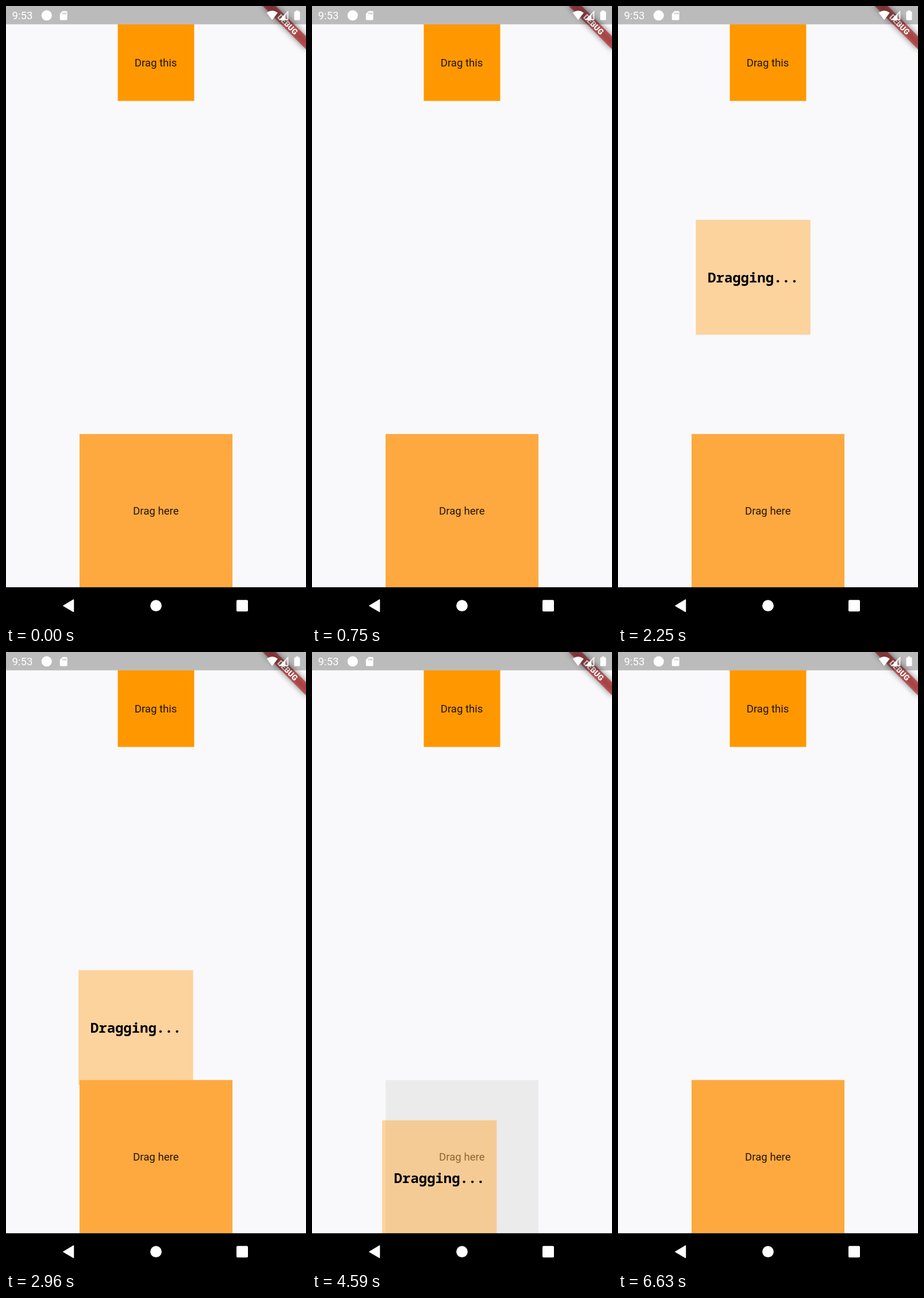
An HTML page for the animation above (6.85 s loop, 522 px wide and 1073 px high).

```html
<!DOCTYPE html>
<html lang="en">
<head>
<meta charset="utf-8">
<title>Drag and drop</title>
<style>
  html, body { margin: 0; width: 100%; height: 100%; overflow: hidden; background: #f9f9fb; }
  svg { display: block; width: 100%; height: 100%; }
  text { text-anchor: middle; }
  .label { font: 400 18.6px Roboto, sans-serif; fill: #000; fill-opacity: .87; }
  .mono { font: 700 23.93px "Noto Sans Mono", "DejaVu Sans Mono", monospace; fill: #000; }
  .clock { font: 400 18.6px Roboto, sans-serif; fill: #fff; text-anchor: start; }
  .debug { font: 900 13.56px Roboto, sans-serif; fill: #fff; }
</style>
</head>
<body>
<svg viewBox="0 0 522 1073">
  <defs>
    <filter id="blur" x="-30%" y="-200%" width="160%" height="500%">
      <feGaussianBlur stdDeviation="5.2"/>
    </filter>
  </defs>
  <rect width="522" height="1073" fill="#f9f9fb"/>

  <rect x="194.5" y="31.8" width="133" height="133" fill="#ff9800"/>
  <text class="label" x="260.6" y="104.8">Drag this</text>

  <rect id="target" x="128" y="743.2" width="266" height="266" fill="#fea940"/>
  <text class="label" x="260.8" y="882.8">Drag here</text>

  <g id="feedback" visibility="hidden">
    <rect width="199.4" height="199.4" fill="#ffab40" fill-opacity=".5"/>
    <text class="mono" x="99.7" y="108.6">Dragging...</text>
  </g>

  <!-- corner ribbon -->
  <g transform="translate(522 0) rotate(45)">
    <rect x="-53.2" y="37.2" width="106.4" height="16" fill="#000" fill-opacity=".5" filter="url(#blur)"/>
    <rect x="-53.2" y="37.2" width="106.4" height="16" fill="#b71c1c" fill-opacity=".63"/>
    <text class="debug" x="0" y="50">DEBUG</text>
  </g>

  <!-- status bar -->
  <rect width="522" height="31.8" fill="#000" fill-opacity=".25"/>
  <text class="clock" x="10.6" y="23.2">9:53</text>
  <g fill="#fff">
    <circle cx="70.8" cy="16.3" r="9"/>
    <path fill-rule="evenodd" d="M98.5 8.8H105Q106.6 8.8 106.6 10.4V22.8Q106.6 24.4 105 24.4H95.400Q93.800 24.4 93.800 22.8V13.500Z
      M98.300 11.500V14.500H99.800V11.500Z M100.900 11.500V14.500H102.400V11.500Z M103.500 11.500V14.500H105V11.500Z"/>
    <path d="M463.200 24.300L453.600 11.700Q463.200 4.300 472.800 11.700Z"/>
    <path d="M476.500 23.700L490.500 9.700V23.700Z" fill-opacity=".3" stroke="#fff" stroke-width="1.500"/>
    <path d="M476 24.200L486 14.200V24.200Z"/>
    <path d="M504.300 7.800H508.700V9.500H510.400Q511.500 9.500 511.500 10.600V23.300Q511.500 24.400 510.400 24.400H502.600Q501.500 24.400 501.500 23.300V10.600Q501.500 9.500 502.600 9.500H504.300Z"/>
  </g>

  <!-- navigation bar -->
  <rect y="1009.200" width="522" height="64"/>
  <g fill="#fff">
    <path d="M100 1041.300L117.500 1031V1051.600Z" stroke="#fff" stroke-width="1.500" stroke-linejoin="round"/>
    <circle cx="261" cy="1041.200" r="9.900"/>
    <rect x="401" y="1031.300" width="20" height="20" rx="2"/>
  </g>
</svg>
<script>
  const LOOP = 6850;
  const GRAB = 1400, REST = 3300, RESUME = 3960, ARRIVE = 4340, DROP = 4710;
  const START = [194.6, 31.9], PAUSE = [126, 587], END = [122, 813.2];
  const HOVER_Y = 677;

  const feedback = document.getElementById('feedback');
  const target = document.getElementById('target');

  const mix = (a, b, k) => a + (b - a) * k;
  const progress = (t, from, to) => Math.min(1, Math.max(0, (t - from) / (to - from)));
  const easeOut = (k, power) => 1 - (1 - k) ** power;
  const smooth = k => k * k * (3 - 2 * k);

  function position(t) {
    if (t < RESUME) {
      const k = progress(t, GRAB + 20, REST);
      return [mix(START[0], PAUSE[0], easeOut(k, 3.4)), mix(START[1], PAUSE[1], easeOut(k, 1.62))];
    }
    const k = smooth(progress(t, RESUME, ARRIVE));
    return START.map((_, i) => mix(PAUSE[i], END[i], k));
  }

  function draw(t) {
    const dragging = t >= GRAB && t < DROP;
    const [x, y] = position(t);
    feedback.setAttribute('visibility', dragging ? 'visible' : 'hidden');
    feedback.setAttribute('transform', `translate(${x.toFixed(2)} ${y.toFixed(2)})`);
    target.setAttribute('fill', dragging && y > HOVER_Y ? '#ebebeb' : '#fea940');
  }

  const began = performance.now();
  function tick() {
    draw((performance.now() - began) % LOOP);
    requestAnimationFrame(tick);
  }
  tick();
</script>
</body>
</html>
```
